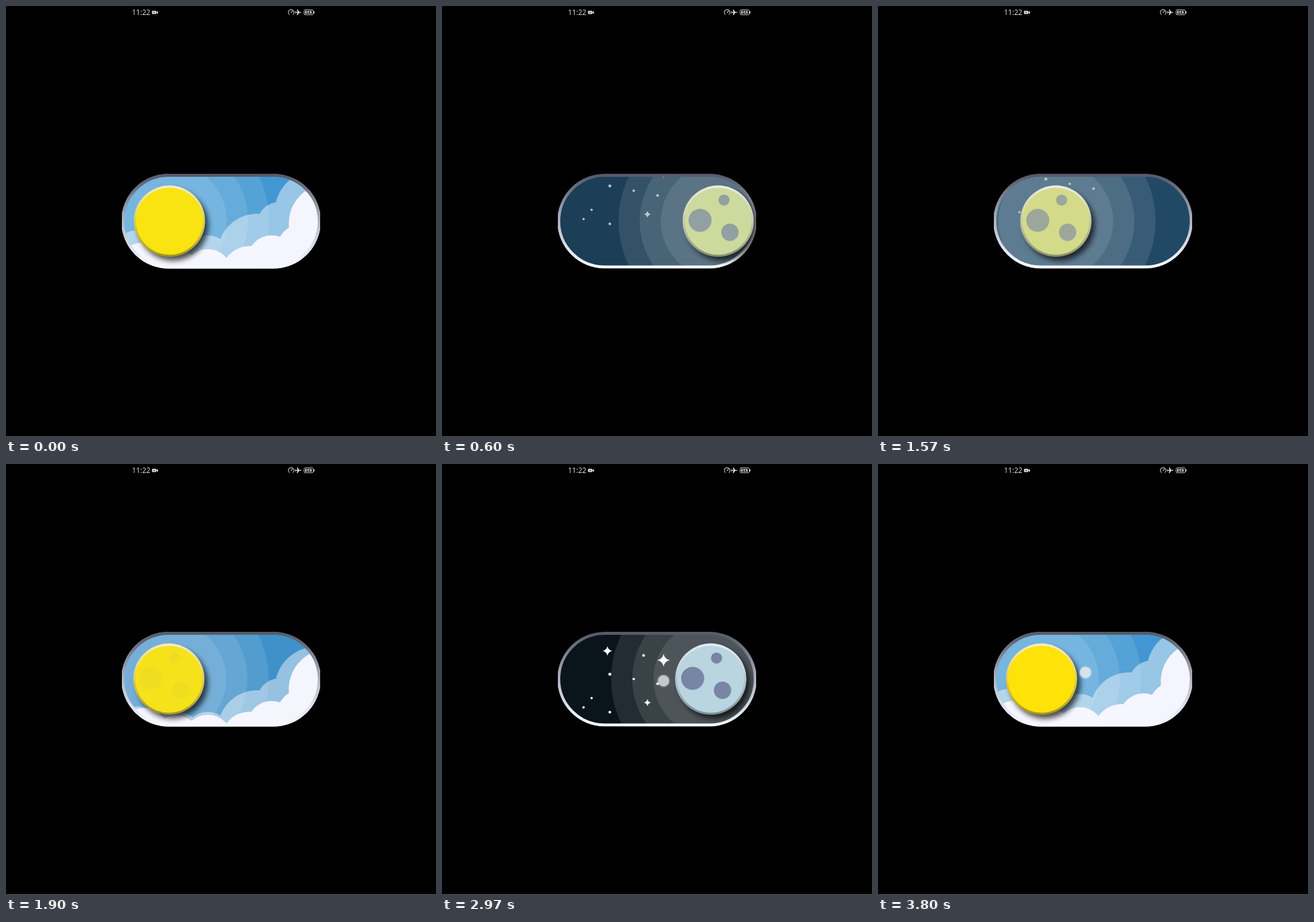
Recreate the animation shown at these times as an HTML page. Size 720 px wide and 720 px high, loop 3.83 s.

```html
<!DOCTYPE html>
<html lang="en">
<head>
<meta charset="utf-8">
<title>Day and night switch</title>
<style>
  html, body { margin: 0; width: 100%; height: 100%; overflow: hidden; background: #000; }
  svg { display: block; width: 100vw; height: 100vh; }
  text { font-family: "Open Sans", "Noto Sans", sans-serif; }
</style>
</head>
<body>
<svg viewBox="0 0 720 720" xmlns="http://www.w3.org/2000/svg">
  <defs>
    <clipPath id="screen"><rect x="194" y="0" width="332" height="720"/></clipPath>
    <clipPath id="pill"><rect x="193" y="281" width="334" height="158.5" rx="79.2"/></clipPath>
    <linearGradient id="edge" x1="0" y1="0" x2="0" y2="1">
      <stop offset="0" stop-color="#575b68"/>
      <stop offset=".12" stop-color="#686c7b"/>
      <stop offset=".5" stop-color="#b2b3c1"/>
      <stop offset=".85" stop-color="#e6e9f3"/>
      <stop offset="1" stop-color="#f8faff"/>
    </linearGradient>
    <linearGradient id="rim" x1="0" y1="0" x2="0" y2="1">
      <stop offset="0" stop-color="#f2f0fa" stop-opacity=".8"/>
      <stop offset=".35" stop-color="#d8d6de" stop-opacity=".45"/>
      <stop offset=".65" stop-color="#88889a" stop-opacity=".4"/>
      <stop offset="1" stop-color="#303038" stop-opacity=".45"/>
    </linearGradient>
    <linearGradient id="dent" x1="0" y1="0" x2="1" y2="1">
      <stop offset="0" stop-color="#4d5878" stop-opacity=".6"/>
      <stop offset=".6" stop-color="#6c789a" stop-opacity=".2"/>
      <stop offset="1" stop-color="#e2eef6" stop-opacity=".5"/>
    </linearGradient>
    <filter id="soft" x="-30%" y="-30%" width="160%" height="160%"><feGaussianBlur stdDeviation="5"/></filter>
    <filter id="haze" x="-60%" y="-60%" width="220%" height="220%"><feGaussianBlur stdDeviation="1.2"/></filter>
  </defs>
  <rect width="720" height="720"/>

  <g fill="#e4e4e4">
    <text x="211" y="15.4" font-size="12">11:22</text>
    <rect x="244.5" y="8" width="7" height="5.6" rx="1"/>
    <path d="M251 10.8l3.4-2.6v5.2z"/>
    <path d="M248 9.3v3M246.5 10.8h3" stroke="#222" stroke-width=".8"/>
    <path d="M474.7 14.6a4.7 4.7 0 1 1 5.6 0M477 11.6l3-3.4" fill="none" stroke="#d8d8d8" stroke-width="1.1"/>
    <path d="M485.5 9.9h2.7l-1.3-4h1.3l2.8 4h3q1.3.7 0 1.4h-3l-2.8 4h-1.3l1.3-4h-2.7l-.8 1.2h-.8l.6-1.9-.6-1.9h.8z"/>
    <rect x="499.2" y="6.5" width="15.2" height="8.2" rx="1.8" fill="none" stroke="#d8d8d8" stroke-width="1"/>
    <rect x="501" y="8.2" width="10.6" height="4.8" rx=".6"/>
    <rect x="515" y="9" width="1.4" height="3.4"/>
    <text x="502.4" y="13" font-size="6.6" font-weight="700" fill="#111">64</text>
  </g>

  <g clip-path="url(#screen)">
    <g clip-path="url(#pill)">
      <rect id="sky" x="190" y="278" width="340" height="165"/>
      <g id="rings" fill="#fff" fill-opacity=".1">
        <circle cy="360" r="167"/><circle cy="360" r="131.5"/><circle cy="360" r="96"/>
      </g>
      <g id="stars" fill="#f6faff"></g>
      <g id="back" fill="#fff" opacity=".45"></g>
      <g id="front" fill="#f8f7ff" opacity=".97"></g>
      <rect x="195.5" y="283.5" width="329" height="153.5" rx="76.7" fill="none" stroke="url(#edge)" stroke-width="5"/>
      <g id="knob">
        <circle cx="6" cy="7" r="59" opacity=".7" filter="url(#soft)"/>
        <circle id="base" r="59.6"/>
        <circle r="59.6" fill="url(#rim)"/>
        <circle id="face" cy=".2" r="56"/>
        <g id="craters" fill="#7885a5" stroke="url(#dent)" stroke-width="1.6">
          <circle cx="-30" cy="-1" r="19"/><circle cx="10" cy="-35" r="9"/><circle cx="20" cy="19" r="14.2"/>
        </g>
      </g>
    </g>
    <g id="touch">
      <circle r="10.5" fill="#fff" opacity=".35" filter="url(#haze)"/>
      <circle r="9.3" fill="#e1e5ea" opacity=".85"/>
    </g>
  </g>
</svg>
<script>
const LOOP = 3830, SPAN = 660;
// start time, 1 = towards night
const TOGGLES = [[164, 1], [1297, 0], [2140, 1], [3143, 0]];
const DAY = { sky: [66, 151, 210], disc: [249, 227, 16] };
const NIGHT = { sky: [10, 20, 27], disc: [184, 213, 224] };
const PRESSED_SUN = [255, 226, 8];

const el = id => document.getElementById(id);
const clamp = v => Math.max(0, Math.min(1, v));
const mix = (a, b, k) => a.map((v, i) => v + (b[i] - v) * k);
const rgb = c => `rgb(${c.map(Math.round)})`;
const move = (id, x, y) => el(id).setAttribute("transform", `translate(${x.toFixed(2)} ${y.toFixed(2)})`);

function add(parent, tag, attrs) {
  const node = document.createElementNS("http://www.w3.org/2000/svg", tag);
  for (const k in attrs) node.setAttribute(k, attrs[k]);
  el(parent).append(node);
}

function cloud(id, puffs, floor) {
  for (const [cx, cy, r] of puffs) add(id, "circle", { cx, cy, r });
  add(id, "rect", { x: 180, y: floor, width: 360, height: 120 });
}

cloud("back", [[222, 421, 46], [285, 430, 46], [338, 424, 40], [420, 413, 65], [458, 366, 38], [520, 345, 70]], 424);
cloud("front", [[230, 440, 44], [285, 448, 40], [338, 447, 40], [408, 450, 48], [445, 425, 41], [500, 411, 48], [540, 364, 66.5]], 434);

for (const [cx, cy, r] of [[281, 352, 2.5], [281, 415.5, 2.3], [250.5, 392, 2], [237, 407.5, 2],
  [321, 360, 2.1], [337.5, 320.5, 2.3], [361, 368, 2.2]]) add("stars", "circle", { cx, cy, r });

for (const [x, y, s] of [[277, 313, 8], [371, 328.5, 10.5], [344, 399.5, 6]]) {
  const k = s * .18;
  add("stars", "path", { d: `M${x} ${y - s}Q${x + k} ${y - k} ${x + s} ${y}Q${x + k} ${y + k} ${x} ${y + s}` +
    `Q${x - k} ${y + k} ${x - s} ${y}Q${x - k} ${y - k} ${x} ${y - s}z` });
}

function bezier(x1, y1, x2, y2) {
  const at = (a, b, s) => 3 * (1 - s) * (1 - s) * s * a + 3 * (1 - s) * s * s * b + s * s * s;
  return x => {
    let lo = 0, hi = 1;
    for (let i = 0; i < 24; i++) {
      const m = (lo + hi) / 2;
      if (at(x1, x2, m) < x) lo = m; else hi = m;
    }
    return at(y1, y2, (lo + hi) / 2);
  };
}
const slide = bezier(.65, 1.47, .54, 1);

function draw(t) {
  let night = 0, pos = 0, tap = null;
  for (const [start, toNight] of TOGGLES) {
    if (t >= start) {
      const x = clamp((t - start) / SPAN), y = x < 1 ? slide(x) : 1;
      night = toNight ? x : 1 - x;
      pos = toNight ? y : 1 - y;
    }
    // the finger shows shortly before each switch
    const lead = (start - t + LOOP) % LOOP;
    if (lead > 165 && lead < 230) tap = toNight;
  }

  const tint = clamp((night - .04) / .92), q = 1 - night;
  const knobX = 273.7 + 176.3 * pos;
  const day = tap === 1 ? PRESSED_SUN : DAY.disc;
  const disc = rgb(mix(day, NIGHT.disc, tint));

  el("sky").setAttribute("fill", rgb(mix(DAY.sky, NIGHT.sky, tint)));
  el("face").setAttribute("fill", disc);
  el("base").setAttribute("fill", disc);
  el("craters").setAttribute("opacity", tint);
  el("stars").setAttribute("opacity", tint);
  move("rings", knobX, 0);
  move("knob", knobX, 360.2);
  move("stars", 0, -150 * q);
  move("back", 0, 365 * night);
  move("front", 0, 420 * night ** 1.42);
  el("touch").setAttribute("opacity", tap === null ? 0 : tap ? 1 : .88);
  move("touch", tap ? 347.3 : 371, tap ? 349 : 363);
}

const begin = performance.now();
function tick() {
  draw((performance.now() - begin) % LOOP);
  requestAnimationFrame(tick);
}
draw(0);
requestAnimationFrame(tick);
</script>
</body>
</html>
```
